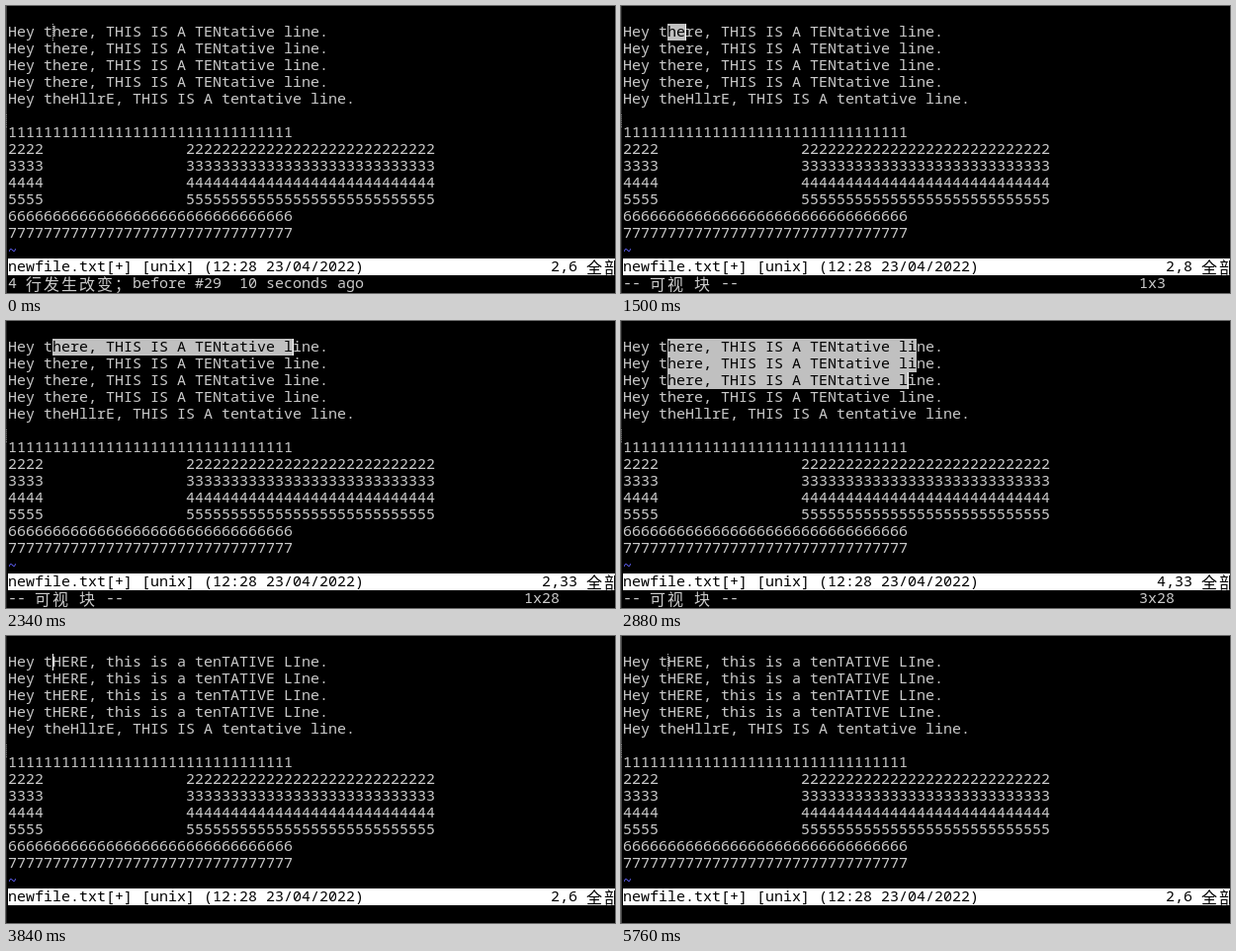
Write an HTML page that moves like this. It is 616 by 291 pixels and loops after 5.82 s.

```html
<!DOCTYPE html>
<html lang="zh-CN">
<head>
<meta charset="utf-8">
<title>Block selection</title>
<style>
  html, body { margin: 0; width: 100%; height: 100%; overflow: hidden; background: #000; }
  #stage { position: relative; width: 616px; height: 291px; overflow: hidden; background: #000; }
  #stage div { position: absolute; }
  .text {
    font: 500 15px/18px "Noto Sans Mono", "DejaVu Sans Mono", monospace;
    font-variant-ligatures: none;
    white-space: pre;
    color: #cacaca;
  }
  .text.status, .text .picked { color: #000; }
  .text.tilde { color: #6464ff; margin-top: 1px; }
  .wide {
    position: relative; top: 2px;
    font: 300 16px/0 "Noto Sans CJK SC", "Noto Sans CJK", sans-serif;
    letter-spacing: 2px;
  }
  .bar { width: 614px; height: 17px; background: #fff; }
  .mark { height: 17px; background: #c0c0c0; }
  .dots, #cursor.idle { background: repeating-linear-gradient(#d0d0d0 0 1px, #000 1px 2px); }
  .dots { width: 1px; height: 13px; opacity: .6; }
  #cursor { width: 1px; height: 17px; background: #fff; }
  #edge { width: 1px; height: 291px; background: #222; }
  #edge.idle { background: #444; }
</style>
</head>
<body>
<div id="stage"></div>
<script>
const LOOP = 5820, CELL = 9, ROW = 17;
const FOCUS = 300, VISUAL = 720, SWAP = 3840, BLUR = 5760;
const ANCHOR = { line: 2, col: 6 };
const STATUS_ROW = 15, COMMAND_ROW = 16;

// Cursor moves while selecting: [time, line, column]
const moves = [[0, 2, 6], [1020, 2, 7]];
[8, 10, 12, 14, 16, 18, 20, 22, 23, 25, 27, 28, 30, 31, 33]
  .forEach((col, i) => moves.push([1500 + 60 * i, 2, col]));
moves.push([2700, 3, 33], [2880, 4, 33], [3180, 5, 33], [SWAP, 2, 6]);

// Moments at which the cursor is switched: [time, visible]
const blinks = [[0, true], [3660, false], [SWAP, true], [4320, false], [4860, true], [5400, false], [BLUR, true]];

const stage = document.getElementById("stage");
const x = col => 2 + col * CELL;
const y = row => 1 + row * ROW;
const latest = (steps, t) => steps.filter(step => step[0] <= t).pop();
const wide = s => `<span class="wide">${s}</span>`;
const swapCase = s => [...s].map(c => c === c.toLowerCase() ? c.toUpperCase() : c.toLowerCase()).join("");

function box(className, left, top) {
  const el = document.createElement("div");
  el.className = className;
  el.style.left = left + "px";
  el.style.top = top + "px";
  return stage.appendChild(el);
}

function write(row, col, html = "", className = "") {
  const el = box("text " + className, x(col), y(row) - 2);
  el.innerHTML = html;
  return el;
}

const sentence = "Hey there, THIS IS A TENtative line.";
const swapped = sentence.slice(0, 5) + swapCase(sentence.slice(5, 33)) + sentence.slice(33);

const edge = box("", 0, 0);
edge.id = "edge";
box("dots", 0, 110);
box("bar", x(0), y(STATUS_ROW));
const marks = [1, 2, 3, 4].map(row => box("mark", x(ANCHOR.col - 1), y(row)));
const lines = [1, 2, 3, 4].map(row => write(row, 0));
write(5, 0, "Hey theHllrE, THIS IS A tentative line.");
write(7, 0, "1".repeat(32));
["2", "3", "4", "5"].forEach((d, i) =>
  write(8 + i, 0, d.repeat(4) + " ".repeat(16) + d.repeat(28)));
write(12, 0, "6".repeat(32));
write(13, 0, "7".repeat(32));
write(14, 0, "~", "tilde");
write(STATUS_ROW, 0, "newfile.txt[+] [unix] (12:28 23/04/2022)", "status");
const position = write(STATUS_ROW, 60, "", "status");
write(STATUS_ROW, 65, wide("全部"), "status");
const message = write(COMMAND_ROW, 0);
const extent = write(COMMAND_ROW, 58);
const cursor = box("", 0, 0);
cursor.id = "cursor";

function drawLine(i, line, col, selecting, done) {
  const row = i + 1;
  const current = line - 1;
  const from = ANCHOR.col - 1;
  // The block reaches one cell further on every line but the cursor's own.
  const to = !selecting || row > current ? from : row === current ? col - 1 : col;
  const s = done ? swapped : sentence;
  lines[i].innerHTML = s.slice(0, from) + `<span class="picked">${s.slice(from, to)}</span>` + s.slice(to);
  marks[i].style.width = (to - from) * CELL + "px";
}

function draw(t) {
  const [, line, col] = latest(moves, t);
  const selecting = t >= VISUAL && t < SWAP;
  const idle = t < FOCUS || t >= BLUR;

  lines.forEach((_, i) => drawLine(i, line, col, selecting, t >= SWAP));
  position.textContent = `${line},${col}`.padStart(4);
  message.innerHTML = t < VISUAL ? `4 ${wide("行发生改变；")}before #29  10 seconds ago`
    : selecting ? `-- ${wide("可视")} ${wide("块")} --` : "";
  extent.textContent = selecting ? `${line - ANCHOR.line + 1}x${col - ANCHOR.col + 1}` : "";

  cursor.style.left = x(col - 1) + "px";
  cursor.style.top = y(line - 1) + "px";
  cursor.style.visibility = latest(blinks, t)[1] ? "visible" : "hidden";
  cursor.className = edge.className = idle ? "idle" : "";
}

const changes = [...new Set([...moves, ...blinks, [FOCUS], [VISUAL]].map(step => step[0]))].sort((a, b) => a - b);
const start = performance.now();
let shown = -1;

function tick() {
  const t = (performance.now() - start) % LOOP;
  const step = changes.filter(time => time <= t).pop();
  if (step !== shown) draw(shown = step);
  requestAnimationFrame(tick);
}
tick();
</script>
</body>
</html>
```
